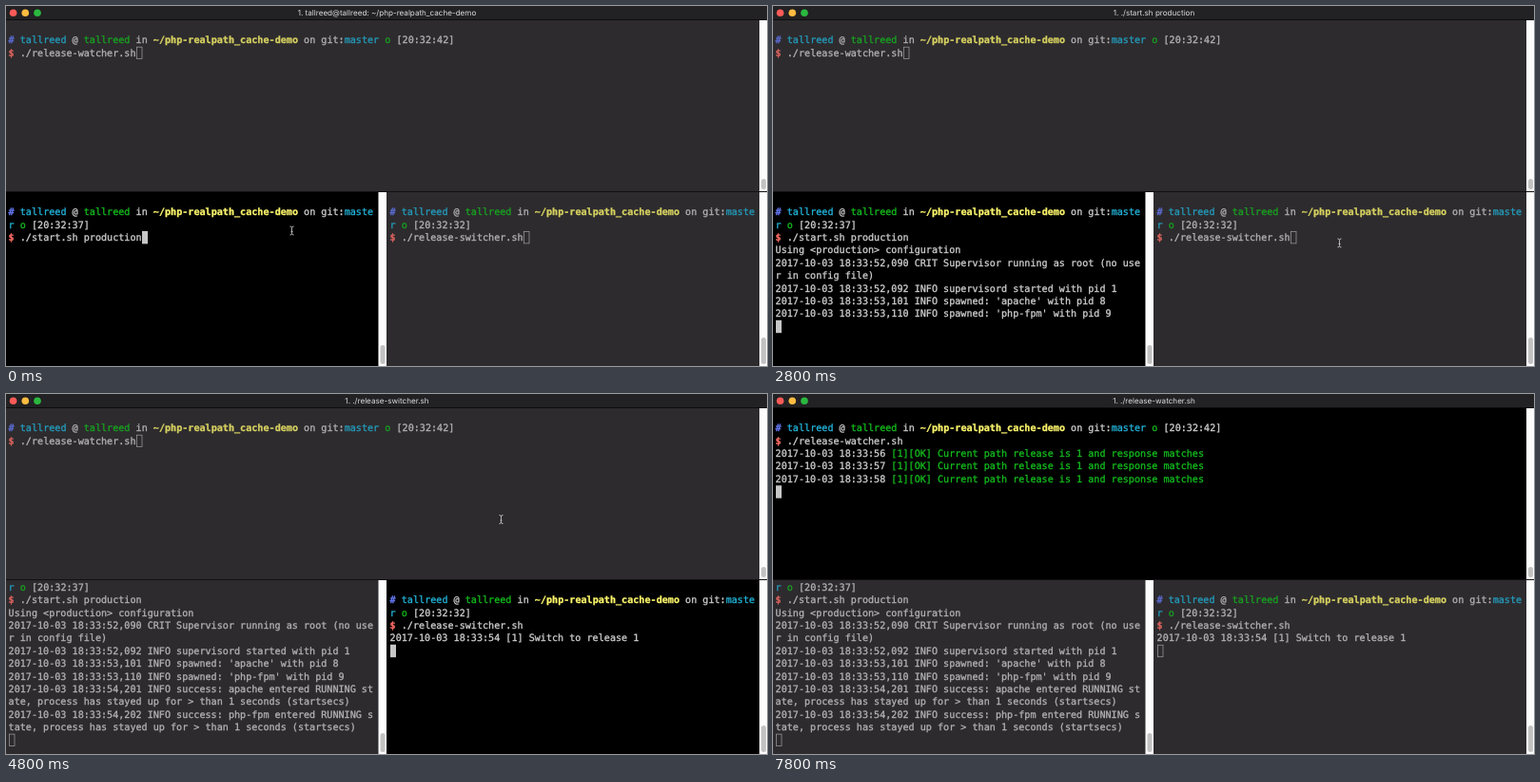
These frames come from a looping animation (800 px wide and 379 px high, 8 s). An HTML page:

```html
<!DOCTYPE html>
<html lang="en">
<head>
<meta charset="utf-8">
<title>Terminal demo</title>
<style>
  html, body { margin: 0; width: 100%; height: 100%; overflow: hidden; background: #2d2b2e; }
  svg { display: block; width: 100%; height: 100%; }
  text { white-space: pre; text-rendering: geometricPrecision; }
  .term { font: 10.116px "DejaVu Sans Mono", monospace; color: #d0d0d0; }
  .term text, .term tspan { fill: currentColor; stroke: currentColor; stroke-width: .3px; }
  .title { font: 8.1px Inter, sans-serif; fill: #dcdcdc; text-anchor: middle; }
  .idle { opacity: .82; }
  .hash, .path, .dollar { font-weight: bold; }
  .hash { color: #6478f0; }
  .cyan { color: #22b4da; }
  .green { color: #14bd1e; }
  .path { color: #fdf76c; }
  .dollar { color: #ff6e67; }
</style>
</head>
<body>
<svg viewBox="0 0 800 379" preserveAspectRatio="none">
  <rect width="800" height="379" fill="#2d2b2e"/>
  <g id="panes"></g>
  <rect y="195" width="800" height="1" fill="#111"/>
  <g id="scrollbars"></g>
  <rect width="800" height="14" fill="#222123"/>
  <rect y="14" width="800" height="1" fill="#0c0c0c"/>
  <circle cx="7.6" cy="7.2" r="3.8" fill="#fc5b57"/>
  <circle cx="20.3" cy="7.2" r="3.8" fill="#fdbc40"/>
  <circle cx="33" cy="7.2" r="3.8" fill="#2bb83f"/>
  <text id="title" class="title" x="400.5" y="10"></text>
  <path id="mouse" d="M-2 -4.5Q0 -4.5 0 -3Q0 -4.5 2 -4.5M0 -3V3M-2 4.5Q0 4.5 0 3Q0 4.5 2 4.5M-1 1H1"
        fill="none" stroke="#c4c4c4" stroke-width=".9"/>
</svg>
<script>
const LOOP = 8000, CELL_W = 6.09, CELL_H = 13.4;
const USER = 'tallreed', REPO = '~/php-realpath_cache-demo';
const $ = id => document.getElementById(id);

const prompt = time => [
  ['hash', '# '], ['cyan', USER], ['', ' @ '], ['green', USER], ['', ' in '],
  ['path', REPO], ['', ' on git:'], ['cyan', 'master '], ['green', 'o '], ['', `[${time}]`]
];
const command = text => [['dollar', '$ '], ['', text]];
const log = text => [['', '2017-10-03 18:33:' + text]];
const match = second => [['', `2017-10-03 18:33:${second} `],
  ['green', '[1][OK] Current path release is 1 and response matches']];

// Each output line carries the time at which it appears.
const panes = {
  top: {
    x: 0, y: 15, w: 792, h: 180, left: 2.6, first: 15.9, cols: 129, rows: 13,
    clock: '20:32:42', command: './release-watcher.sh', enter: 5400,
    output: [[5600, match(56)], [6600, match(57)], [7600, match(58)]]
  },
  start: {
    x: 0, y: 196, w: 391.5, h: 183, left: 2.6, first: 196.8, cols: 63, rows: 13,
    clock: '20:32:37', command: './start.sh production', enter: 200,
    output: [
      [200, [['', 'Using <production> configuration']]],
      [1000, log('52,090 CRIT Supervisor running as root (no user in config file)')],
      [1000, log('52,092 INFO supervisord started with pid 1')],
      [2000, log("53,101 INFO spawned: 'apache' with pid 8")],
      [2000, log("53,110 INFO spawned: 'php-fpm' with pid 9")],
      ...['201 INFO success: apache', '202 INFO success: php-fpm'].map(s => [3000,
        log(`54,${s} entered RUNNING state, process has stayed up for > than 1 seconds (startsecs)`)])
    ]
  },
  switcher: {
    x: 400, y: 196, w: 392, h: 183, left: 403.6, first: 196.8, cols: 63, rows: 13,
    clock: '20:32:32', command: './release-switcher.sh', enter: 3400,
    output: [[3400, log('54 [1] Switch to release 1')]]
  }
};

const focus = [[0, 'start'], [3000, 'switcher'], [5000, 'top']];
// start, end, from, to
const mouseMoves = [
  [0, 200, [300.5, 236.5], [300.5, 236.5]],
  [2200, 2600, [300.5, 236.5], [595.5, 249.5]],
  [2600, 3400, [595.5, 249.5], [595.5, 249.5]],
  [4200, 4800, [595.5, 249.5], [520.5, 132]],
  [4800, 5400, [520.5, 132], [520.5, 132]]
];

const escapeText = s => s.replace(/&/g, '&amp;').replace(/</g, '&lt;').replace(/>/g, '&gt;');
const rect = (x, y, w, h, attrs) => `<rect x="${x}" y="${y}" width="${w}" height="${h}" ${attrs}/>`;

function wrap(segments, cols) {
  const rows = [[]];
  let used = 0;
  for (let [style, text] of segments) {
    while (text) {
      if (used === cols) { rows.push([]); used = 0; }
      const part = text.slice(0, cols - used);
      rows[rows.length - 1].push([style, part]);
      used += part.length;
      text = text.slice(part.length);
    }
  }
  return rows;
}

function drawPane(pane, t, active) {
  const entered = t >= pane.enter;
  const lines = [[], prompt(pane.clock), command(pane.command)];
  for (const [time, line] of pane.output) if (t >= time) lines.push(line);
  if (entered) lines.push([]);

  const rows = lines.flatMap(line => wrap(line, pane.cols)).slice(-pane.rows);
  const top = i => pane.first + i * CELL_H;
  const text = rows.map((row, i) => {
    const spans = row.map(([style, s]) => `<tspan class="${style}">${escapeText(s)}</tspan>`);
    return `<text x="${pane.left}" y="${top(i) + 9.9}">${spans.join('')}</text>`;
  }).join('');

  const col = rows[rows.length - 1].reduce((n, [, s]) => n + s.length, 0);
  const cx = Math.round(pane.left + col * CELL_W), cy = top(rows.length - 1);
  const caret = active
    ? rect(cx, cy, 6, CELL_H, 'fill="#c7c7c7"')
    : rect(cx + .4, cy + .5, 5.6, CELL_H - 1, 'fill="none" stroke="#aaa" stroke-width=".8"');
  const back = rect(pane.x, pane.y, pane.w, pane.h, `fill="${active ? '#000' : '#2d2b2e'}"`);
  return `${back}<g class="term ${active ? '' : 'idle'}">${text}${caret}</g>`;
}

function drawMouse(t) {
  const move = mouseMoves.find(([start, end]) => t >= start && t < end);
  $('mouse').style.display = move ? '' : 'none';
  if (!move) return;
  const [start, end, from, to] = move;
  const p = (t - start) / (end - start), ease = p * p * (3 - 2 * p);
  const [x, y] = from.map((v, i) => v + (to[i] - v) * ease);
  $('mouse').setAttribute('transform', `translate(${x} ${y})`);
}

const bar = (x, y, w, h, knobY, knobH) =>
  rect(x, y, w, h, 'fill="#fcfcfc"') + rect(x + 2, knobY, 5, knobH, 'rx="2.5" fill="#c2c2c2"');
$('scrollbars').innerHTML = bar(792, 15, 8, 180, 182, 11)
  + bar(391.5, 196, 8.5, 183, 357, 20) + bar(792, 196, 8, 183, 349, 28);

const changes = [0, ...focus.map(f => f[0]),
  ...Object.values(panes).flatMap(p => [p.enter, ...p.output.map(o => o[0])])];
let shown = -1;

function frame(now) {
  const t = now % LOOP;
  const step = Math.max(...changes.filter(c => c <= t));
  if (step !== shown) {
    shown = step;
    const active = focus.filter(f => f[0] <= t).pop()[1];
    $('panes').innerHTML = Object.entries(panes)
      .map(([name, pane]) => drawPane(pane, t, name === active)).join('');
    const { enter, command } = panes[active];
    $('title').textContent = '1. ' + (t >= enter ? command : `${USER}@${USER}: ${REPO}`);
  }
  drawMouse(t);
}

const begin = performance.now();
function tick() {
  frame(performance.now() - begin);
  requestAnimationFrame(tick);
}
tick();
</script>
</body>
</html>
```
